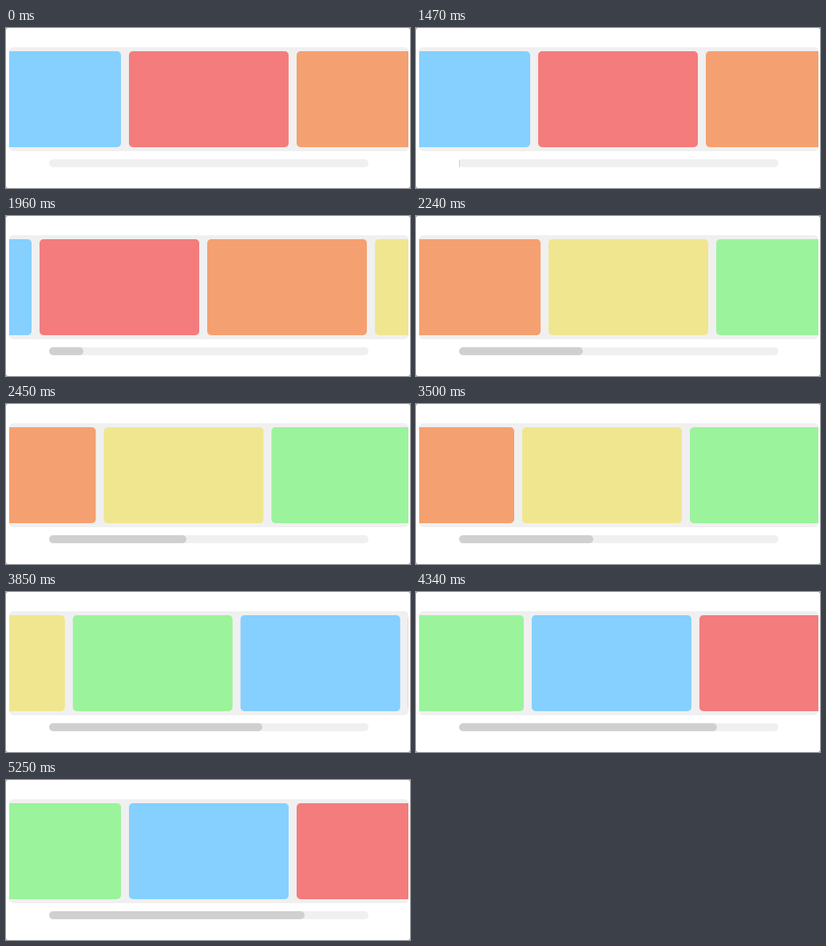
An HTML page that plays this animation: 506x200 px, repeating every 5.32 s.

```html
<!DOCTYPE html>
<html lang="en">
<head>
<meta charset="utf-8">
<title>Carousel with progress bar</title>
<style>
  html, body { margin: 0; width: 100%; height: 100%; overflow: hidden; background: #666; }
  .stage { position: absolute; left: 0; top: 0; width: 506px; height: 200px; background: #fff; border-radius: 2px; overflow: hidden; }
  .view { position: absolute; left: 4px; top: 24px; width: 500px; height: 130px; background: #f0f0f0; border-radius: 5px; overflow: hidden; }
  .strip { position: absolute; left: 150px; top: 5px; }
  .cell { position: absolute; top: 0; width: 200px; height: 120px; border-radius: 5px; }
  .track, .bar { position: absolute; left: 54px; top: 164px; height: 10px; border-radius: 5px; }
  .track { width: 400px; background: #f0f0f0; }
  .bar { width: 0; background: #d0d0d0; }
</style>
</head>
<body>
<div class="stage">
  <div class="view"><div class="strip" id="strip"></div></div>
  <div class="track"></div>
  <div class="bar" id="bar"></div>
</div>
<script>
  const LOOP = 5320, STEP = 70, PITCH = 210, BAR_WIDTH = 400;
  const COLORS = ['#f47c7c', '#f5a070', '#f0e68f', '#9bf39c', '#85d0ff'];
  const N = COLORS.length;
  const strip = document.getElementById('strip');
  const bar = document.getElementById('bar');

  // The cells wrap around, so one extra copy sits before and after the set.
  for (let i = -1; i <= N; i++) {
    const cell = document.createElement('div');
    cell.className = 'cell';
    cell.style.left = i * PITCH + 'px';
    cell.style.background = COLORS[(i + N) % N];
    strip.append(cell);
  }

  // Each swipe: drag points [ms, px, px per ms]; a spring takes over at the last one.
  const SWIPES = [
    [[1430, 0, 0], [1470, 1, 0.06], [1960, 112, 0.65], [2250, 420, 1.2]],
    [[3420, 0, 0], [3500, 21, 0.4], [4000, 420, 0.9]]
  ];
  const DAMPING = 0.00986, FREQ = 0.0029;

  function hermite([t0, x0, v0], [t1, x1, v1], t) {
    const d = t1 - t0, s = (t - t0) / d, r = 1 - s;
    return r * r * (1 + 2 * s) * x0 + s * s * (3 - 2 * s) * x1 + d * s * r * (r * v0 - s * v1);
  }

  function swipe(points, t) {
    if (t <= points[0][0]) return 0;
    const next = points.findIndex(p => t < p[0]);
    if (next > 0) return hermite(points[next - 1], points[next], t);
    const [start, end, v] = points[points.length - 1];
    const dt = t - start;
    const over = v / FREQ * Math.exp(-DAMPING * dt) * Math.sin(FREQ * dt);
    return end + (Math.abs(over) < 0.2 ? 0 : over);
  }

  function draw(time) {
    const t = Math.floor((time % LOOP) / STEP) * STEP;
    const x = SWIPES.reduce((sum, points) => sum + swipe(points, t), 0);
    strip.style.transform = `translateX(${-x}px)`;
    bar.style.width = x / (PITCH * N) * BAR_WIDTH + 'px';
  }

  let origin;
  function tick(now) {
    origin ??= now;
    draw(now - origin);
    requestAnimationFrame(tick);
  }
  draw(0);
  requestAnimationFrame(tick);
</script>
</body>
</html>
```
